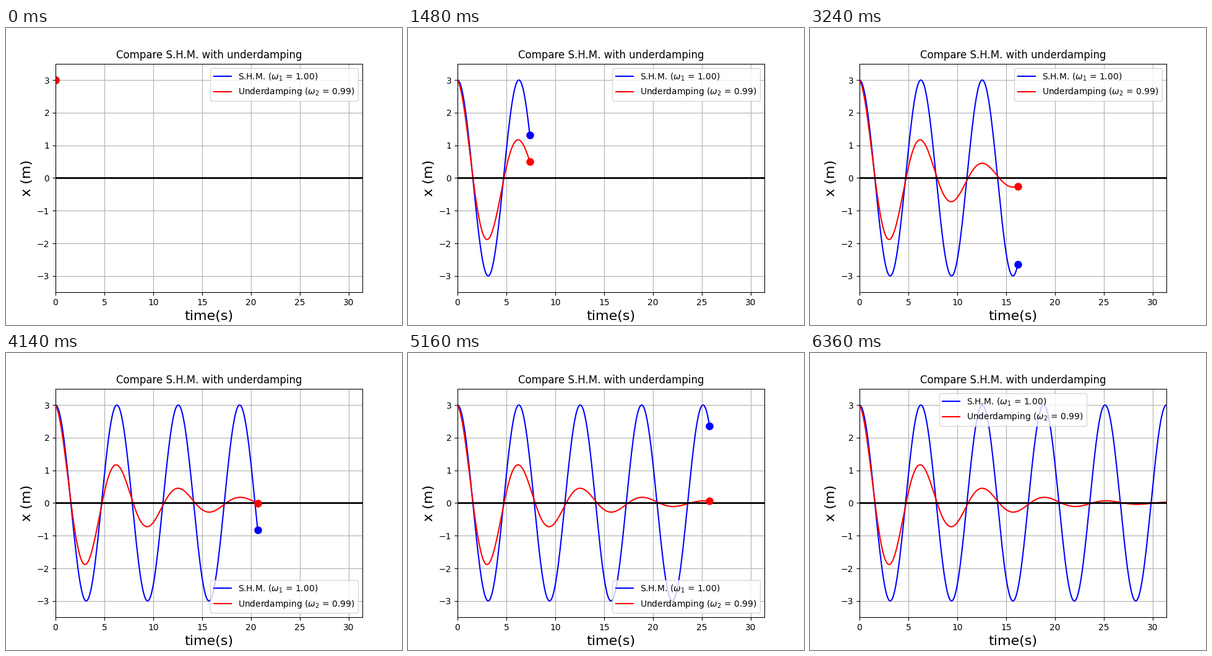
Recreate the animation shown at these times as a matplotlib script. Size 640 by 480 pixels, loop 8000 ms.

```python
import numpy as np
import matplotlib.pyplot as plt
from matplotlib.animation import FuncAnimation

AMP = 3.0
W1 = 1.0
BETA = 0.15
W2 = np.sqrt(W1**2 - BETA**2)
FRAMES = 400
INTERVAL = 20

t = np.arange(FRAMES) * 0.1
shm = AMP * np.cos(W1 * t)
damped = AMP * np.exp(-BETA * t) * np.cos(W2 * t)

fig, ax = plt.subplots(figsize=(6.4, 4.8), dpi=100)
ax.set_title("Compare S.H.M. with underdamping")
ax.set_xlabel("time(s)", fontsize=16)
ax.set_ylabel("x (m)", fontsize=16)
ax.set_xlim(0, 10 * np.pi)
ax.set_ylim(-3.5, 3.5)
ax.grid(True)

shm_line, = ax.plot([], [], "b", label=rf"S.H.M. ($\omega_1$ = {W1:.2f})")
damped_line, = ax.plot([], [], "r", label=rf"Underdamping ($\omega_2$ = {W2:.2f})")
ax.axhline(0, color="k", lw=2)
shm_dot, = ax.plot([], [], "bo", ms=8)
damped_dot, = ax.plot([], [], "ro", ms=8)

# The legend moves to the emptiest spot as the curves grow.
ax.legend(loc="best")

curves = [(shm, shm_line, shm_dot), (damped, damped_line, damped_dot)]


def update(i):
    for x, line, dot in curves:
        line.set_data(t[:i + 1], x[:i + 1])
        dot.set_data([t[i]], [x[i]])
    return shm_line, damped_line, shm_dot, damped_dot


anim = FuncAnimation(fig, update, frames=FRAMES, interval=INTERVAL,
                     init_func=lambda: update(0), repeat=True, repeat_delay=0)
plt.show()
```
